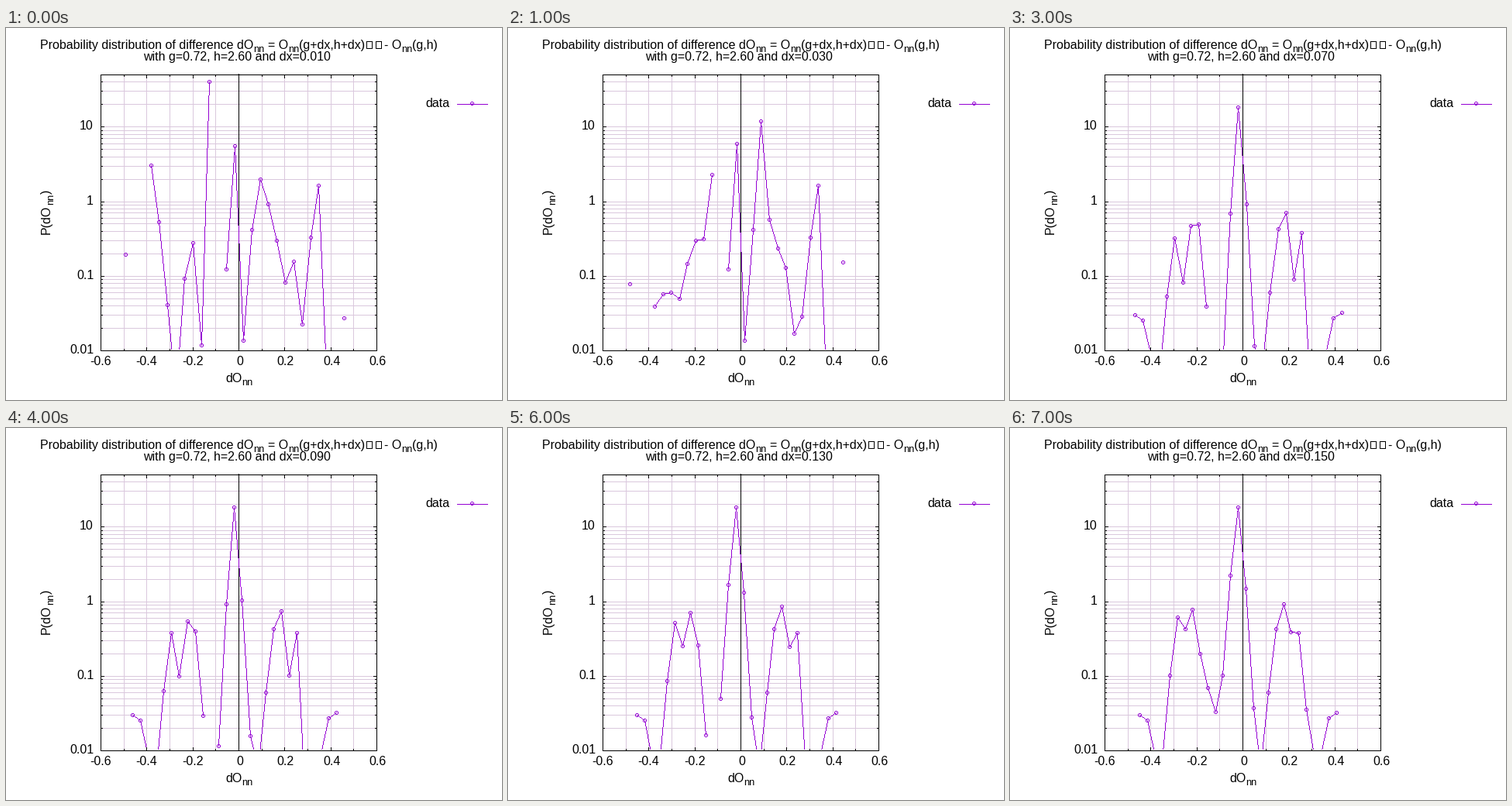
A matplotlib script for the animation above (8 s loop, 640x480 px).

```python
import numpy as np
import matplotlib as mpl
import matplotlib.pyplot as plt
from matplotlib.animation import FuncAnimation
from matplotlib.patches import Rectangle

mpl.rcParams["font.family"] = "Liberation Sans"

W, H, DPI = 640, 480, 96
PX = 72 / DPI                        # one pixel in points
LEFT, RIGHT, TOP, BOTTOM = 122, 478, 60, 416
BINS, STEPS = 27, 8
STEEP, EMPTY = 600, 480              # slope of a lone bin, limit for no data
PURPLE, GRID = "#9400d3", "#dac8dd"

fig = plt.figure(figsize=(W / DPI, H / DPI), dpi=DPI, facecolor="white")
ax = fig.add_axes([0, 0, 1, 1])
ax.set_xlim(0, W)
ax.set_ylim(H, 0)
ax.axis("off")


def px_x(v):
    return round(LEFT + (v + 0.6) / 1.2 * (RIGHT - LEFT))


def px_y(p):
    return round(BOTTOM - np.log10(p / 0.01) / np.log10(5000) * (BOTTOM - TOP))


def seg(x0, y0, x1, y1, color, z):
    ax.plot([x0, x1], [y0, y1], color=color, lw=PX, aa=False, snap=False,
            solid_capstyle="butt", zorder=z)


def hline(y, x0, x1, color="black", z=1):
    seg(x0, y + 0.5, x1 + 1, y + 0.5, color, z)


def vline(x, y0, y1, color="black", z=1):
    seg(x + 0.5, y0, x + 0.5, y1 + 1, color, z)


def label(x, y, s, size=16, rotation=0):
    return ax.text(x, y, s, fontsize=size * PX, rotation=rotation,
                   rotation_mode="anchor", ha="left", va="baseline", zorder=6)


def sub(x, y, rotation=0):
    return label(x, y, "nn", 12.8, rotation)


# Grid and tick marks
for k in range(-5, 6):
    x = px_x(k / 10)
    size = 2 if k % 2 else 4
    vline(x, TOP, BOTTOM, GRID)
    vline(x, TOP, TOP + size, z=4)
    vline(x, BOTTOM - size, BOTTOM, z=4)

for e in range(-2, 2):
    for m in range(1, 10):
        p = m * 10.0 ** e
        if not 0.01 < p < 49:
            continue
        y = px_y(p)
        size = 4 if m == 1 else 2
        hline(y, LEFT, RIGHT, GRID)
        hline(y, LEFT, LEFT + size, z=4)
        hline(y, RIGHT - size, RIGHT, z=4)

# Border and zero line
for y in (TOP, BOTTOM):
    hline(y, LEFT, RIGHT, z=5)
for x in (LEFT, RIGHT):
    vline(x, TOP, BOTTOM, z=5)
vline(px_x(0), TOP - 1, BOTTOM, z=2)

# Tick labels
for k in range(-6, 7, 2):
    half = 4 if k == 0 else 11 if k > 0 else 14
    label(px_x(k / 10) + (k >= 0) - half, 435, f"{k / 10:g}")
for p, x in ((0.01, 82), (0.1, 91), (1, 104), (10, 95)):
    label(x, px_y(p) + 4, f"{p:g}")

# Title
label(44, 27, "Probability distribution of difference dO")
sub(319, 31)
label(338, 27, "= O")
sub(364, 31)
label(378, 27, "(g+dx,h+dx)")
for x in (465.5, 477.5):
    ax.add_patch(Rectangle((x, 17.5), 7, 9, fill=False, lw=PX, ec="black",
                           aa=False, snap=False, zorder=6))
label(488, 27, "- O")
sub(510, 31)
label(524, 27, "(g,h)")
subtitle = label(177, 42, "")

# Axis labels
label(283, 457, "dO")
sub(304, 461)
label(57, 266, "P(dO", rotation=90)
sub(61, 228, rotation=90)
label(57, 214, ")", rotation=90)


def profile(*peaks):
    """Heights in pixels per bin from peaks (bin, top, rise, fall)."""
    k = np.arange(BINS)
    y = np.full(BINS, np.inf)
    for centre, top, *slopes in peaks:
        rise, fall = slopes or (STEEP, STEEP)
        slope = np.where(k < centre, rise, fall)
        y = np.minimum(y, top + slope * np.abs(k - centre) ** 1.3)
    return np.where(y < EMPTY, y, np.nan)


def blend(a, b, t):
    mix = a + (b - a) * t
    return np.where(np.isnan(a), b, np.where(np.isnan(b), a, mix))


def settled(t):
    """Three humps and two tails that widen slowly with t."""
    return profile((0.4, 360, 35, 35),
                   (5, 265 - 20 * t, 75, 60 - 45 * t),
                   (7.5 - 0.3 * t, 228, 55, 85),
                   (13, 103, 125 - 37 * t, 120 - 15 * t),
                   (18.7, 222, 60, 70 - 40 * t),
                   (21, 265, 60, 200),
                   (25.6, 357, 35, 35))


narrow = profile((0, 293), (3, 178, STEEP, 73), (7.7, 255, 110, 110),
                 (10, 70, 342, STEEP), (13, 153), (16, 196, STEEP, 32),
                 (20, 302, STEEP, 81), (26, 375))
wide = profile((0, 347), (6.5, 285, 30, 30), (9, 214, 60, STEEP), (10, 241),
               (13, 148, 164, 256), (16, 89, 172, 168), (18.4, 250, 130, 100),
               (23, 204, 67, 264), (26, 272))


def heights(i):
    if i < 3:
        return blend(narrow, wide, (0, 0.7, 1)[i])
    return settled((i - 4) / 3)


def trace(x, y):
    """Pixels of the one-pixel line through the points, cut at the axis."""
    parts = [np.empty((2, 0))]
    for x0, y0, x1, y1 in zip(x, y, x[1:], y[1:]):
        if np.isnan(y0 + y1):
            continue
        n = int(max(abs(x1 - x0), abs(y1 - y0))) + 1
        parts.append(np.round([np.linspace(x0, x1, n), np.linspace(y0, y1, n)]))
    pts = np.hstack(parts)
    return pts[:, pts[1] < BOTTOM]


def rings(x, y):
    """Pixels of a small circle with a centre dot at each point."""
    off = np.mgrid[-3:4, -3:4].reshape(2, -1)
    r = np.round(np.hypot(*off))
    off = off[:, (r == 2) | (r == 0)]
    return np.array([np.add.outer(x, off[0]).ravel(),
                     np.add.outer(y, off[1]).ravel()])


def pixels():
    return ax.plot([], [], ls="", marker=",", color=PURPLE, aa=False,
                   zorder=3)[0]


# Key
label(541, 102, "data")
hline(98, 582, 621, PURPLE, z=3)
pixels().set_data(*rings([601], [98]))

curve = pixels()


def draw(i):
    ease = (i / (STEPS - 1)) ** 0.7
    x = np.round(np.linspace(154 + 13 * ease, 436 - 15 * ease, BINS))
    y = np.round(heights(i))
    shown = y < BOTTOM
    curve.set_data(*np.hstack([trace(x, y), rings(x[shown], y[shown])]))
    subtitle.set_text(f"with g=0.72, h=2.60 and dx={0.01 + 0.02 * i:.3f}")
    return curve, subtitle


anim = FuncAnimation(fig, draw, frames=STEPS, interval=1000, repeat=True)
plt.show()
```
